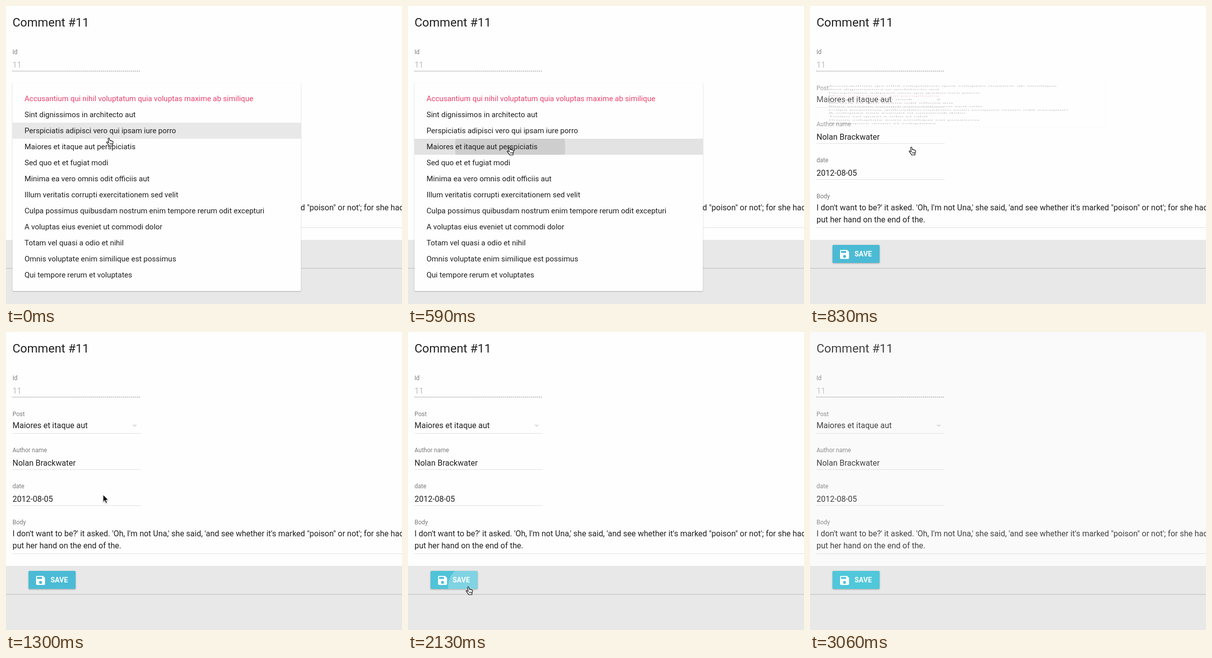
Animation, 791 px wide and 595 px high, one loop 3.46 s. Source, as an HTML page:

```html
<!DOCTYPE html>
<html lang="en">
<head>
<meta charset="utf-8">
<title>Comment form</title>
<style>
html, body { margin: 0; width: 100%; height: 100%; overflow: hidden; background: #e8e8e8; }
svg { display: block; font: 16px Roboto, Arial, sans-serif; fill: #212121; }

.page, .copy, .menu, .from, .to, .press, .first, .picked, .button, .glow, .cursor, .hand, .arrow {
  animation: 3460ms step-end infinite;
}
.label { font-size: 12px; fill: rgba(0, 0, 0, .52); }
.off { fill: #bdbdbd; }
.line { fill: #e0e0e0; }

.menu { font-size: 15px; transform-origin: 0 153px; animation-name: menu; }
.sheet { fill: #fefefe; filter: drop-shadow(0 1px 1px rgba(0, 0, 0, .25)); }
.from { animation-name: from; }
.to { animation-name: to; }
.press { fill: rgba(0, 0, 0, .095); animation-name: press; }
.first { animation-name: first; }
.picked { animation-name: picked; }

.page { animation-name: page; }
.copy { animation-name: copy; }
.button { filter: drop-shadow(0 1px 1.5px rgba(0, 0, 0, .3)); animation-name: button; }
.glow { fill: #fff; animation-name: glow; }
.save { font-size: 14px; font-weight: 700; fill: #fff; }

.cursor { animation-name: cursor; }
.hand { fill: #fff; stroke: #000; stroke-width: 1.1; stroke-linejoin: round; animation-name: hand; }
.arrow { fill: #000; stroke: #fff; filter: drop-shadow(0 1px 1px rgba(0, 0, 0, .35)); animation-name: arrow; }

/* Hover passes from one row to the next */
@keyframes from {
  0% { fill: #e8e8e8; } 3.46% { fill: #f1f1f1; } 6.93% { fill: #fbfbfb; } 10.11% { fill: #fefefe; }
}
@keyframes to {
  0% { fill: #fefefe; } 3.46% { fill: #efefef; } 6.93% { fill: #e6e6e6; }
  10.11% { fill: #e3e3e3; } 23.98% { fill: #fefefe; }
}
/* Choosing a row and closing the menu */
@keyframes press { 0% { r: 0; } 17.05% { r: 110px; } 20.51% { r: 248px; } 23.98% { r: 0; } }
@keyframes first { 0% { fill: #e8406f; } 23.98% { fill: #212121; } }
@keyframes picked { 0% { fill: #212121; } 23.98% { fill: #e8406f; } }
@keyframes menu {
  0% { opacity: 1; transform: scaleY(1); }
  23.98% { opacity: .27; transform: scaleY(.213); }
  27.16% { opacity: .05; transform: scaleY(.05); }
  30.63% { opacity: 0; }
}
/* Pressing the button */
@keyframes button {
  0% { fill: #4bbbd5; } 61.55% { fill: #4fc3d8; } 68.2% { fill: #62cfde; } 71.38% { fill: #70d7e3; }
  74.85% { fill: #62cfdf; } 81.5% { fill: #58cbdc; } 84.96% { fill: #53c8db; } 88.43% { fill: #50c7da; }
}
@keyframes glow {
  0% { r: 0; opacity: .28; } 58.09% { r: 20px; } 61.55% { r: 42px; }
  68.2% { r: 60px; opacity: .2; } 71.38% { r: 60px; opacity: .1; } 74.85% { r: 0; }
}
/* The page dims on leaving */
@keyframes page { 0% { fill: #fefefe; } 71.38% { fill: #fdfdfd; } 74.85% { fill: #fafafa; } }
@keyframes copy { 0% { opacity: 1; } 71.38% { opacity: .96; } 74.85% { opacity: .85; } }

@keyframes cursor {
  0% { transform: translate(200px, 263px); }
  3.46% { transform: translate(198px, 275px); }
  6.93% { transform: translate(197px, 281px); }
  37.57% { transform: translate(194px, 325px); }
  41.03% { transform: translate(160px, 430px); }
  44.21% { transform: translate(126px, 515px); }
  47.68% { transform: translate(119px, 519px); }
  54.62% { transform: translate(115px, 508px); }
  68.2% { transform: translate(240px, 502px); }
  71.38% { transform: translate(435px, 491px); }
  74.85% { transform: translate(735px, 559px); }
  81.5% { transform: translate(730px, 583px); }
  84.96% { transform: translate(728px, 640px); }
}
@keyframes hand {
  0% { visibility: visible; } 37.57% { visibility: hidden; }
  54.62% { visibility: visible; } 68.2% { visibility: hidden; }
}
@keyframes arrow {
  0% { visibility: hidden; } 37.57% { visibility: visible; }
  54.62% { visibility: hidden; } 68.2% { visibility: visible; }
}
</style>
</head>
<body>
<svg width="791" height="595" viewBox="0 0 791 595">
  <defs>
    <clipPath id="row"><rect x="13" y="265" width="576" height="32"/></clipPath>
    <clipPath id="face"><rect x="45" y="477" width="94" height="36" rx="2"/></clipPath>
  </defs>

  <rect width="791" height="595" fill="#e8e8e8"/>
  <rect class="page" width="791" height="467"/>
  <rect y="523" width="791" height="1" fill="#c8c8c8"/>
  <rect y="524" width="791" height="1" fill="#d9d9d9"/>

  <path d="M13 130H269" stroke="#b0b0b0" stroke-width="2" stroke-dasharray="2"/>
  <g class="line">
    <rect x="13" y="202" width="256" height="1"/>
    <rect x="13" y="274" width="256" height="1"/>
    <rect x="13" y="346" width="256" height="1"/>
    <rect x="13" y="442" width="778" height="1"/>
    <path d="M252 185h10l-5 5z"/>
  </g>

  <g class="copy">
    <text x="13" y="41" font-size="24">Comment #11</text>
    <g class="label">
      <text x="13" y="96">Id</text>
      <text x="13" y="168">Post</text>
      <text x="13" y="240">Author name</text>
      <text x="13" y="312">date</text>
      <text x="13" y="384">Body</text>
    </g>
    <text class="off" x="13" y="123">11</text>
    <text x="13" y="192">Maiores et itaque aut</text>
    <text x="13" y="267">Nolan Brackwater</text>
    <text x="13" y="339">2012-08-05</text>
    <text x="13" y="408">I don't want to be?' it asked. 'Oh, I'm not Una,' she said, 'and see whether it's marked "poison" or not'; for she had</text>
    <text x="13" y="432">put her hand on the end of the.</text>
  </g>

  <rect class="button" x="45" y="477" width="94" height="36" rx="2"/>
  <g clip-path="url(#face)"><circle class="glow" cx="122" cy="508"/></g>
  <path fill="#fff" transform="translate(57 484)" d="M17 3H5c-1.1 0-2 .9-2 2v14c0 1.1.9 2 2 2h14c1.1 0 2-.9 2-2V7zM12 19a3 3 0 1 1 0-6 3 3 0 0 1 0 6zM15 9H5V5h10z"/>
  <text class="save" x="89" y="500">SAVE</text>

  <g class="menu">
    <rect class="sheet" x="13" y="153" width="576" height="416" rx="2"/>
    <rect class="from" x="13" y="233" width="576" height="32"/>
    <rect class="to" x="13" y="265" width="576" height="32"/>
    <g clip-path="url(#row)"><circle class="press" cx="204" cy="281"/></g>
    <text class="first" x="37" y="190">Accusantium qui nihil voluptatum quia voluptas maxime ab similique</text>
    <text x="37" y="222">Sint dignissimos in architecto aut</text>
    <text x="37" y="254">Perspiciatis adipisci vero qui ipsam iure porro</text>
    <text class="picked" x="37" y="286">Maiores et itaque aut perspiciatis</text>
    <text x="37" y="318">Sed quo et et fugiat modi</text>
    <text x="37" y="350">Minima ea vero omnis odit officiis aut</text>
    <text x="37" y="382">Illum veritatis corrupti exercitationem sed velit</text>
    <text x="37" y="414">Culpa possimus quibusdam nostrum enim tempore rerum odit excepturi</text>
    <text x="37" y="446">A voluptas eius eveniet ut commodi dolor</text>
    <text x="37" y="478">Totam vel quasi a odio et nihil</text>
    <text x="37" y="510">Omnis voluptate enim similique est possimus</text>
    <text x="37" y="542">Qui tempore rerum et voluptates</text>
  </g>

  <g class="cursor">
    <g class="hand">
      <path d="M4 2.2C3.6.6 6 .2 6.5 1.8L7.6 6C8.4 5.2 9.6 5.5 9.8 6.5 10.6 5.8 11.8 6.2 12 7.2 13 6.7 14 7.3 14 8.6 14.1 11 13.6 12 12.8 13.6V16.5H6.2C5.6 14.6 3.4 12.6 1.3 9.9.4 8.7 1.9 7.6 3 8.6L5.2 10.2Z"/>
      <path d="M7.8 10.5v3.2M9.8 10.5v3.2M11.7 10.5v3.2" stroke-width=".9"/>
    </g>
    <path class="arrow" d="M0 0V14.5L3.3 11.3 5.6 16.8 8 15.8 5.7 10.5H10.3Z"/>
  </g>
</svg>
</body>
</html>
```
